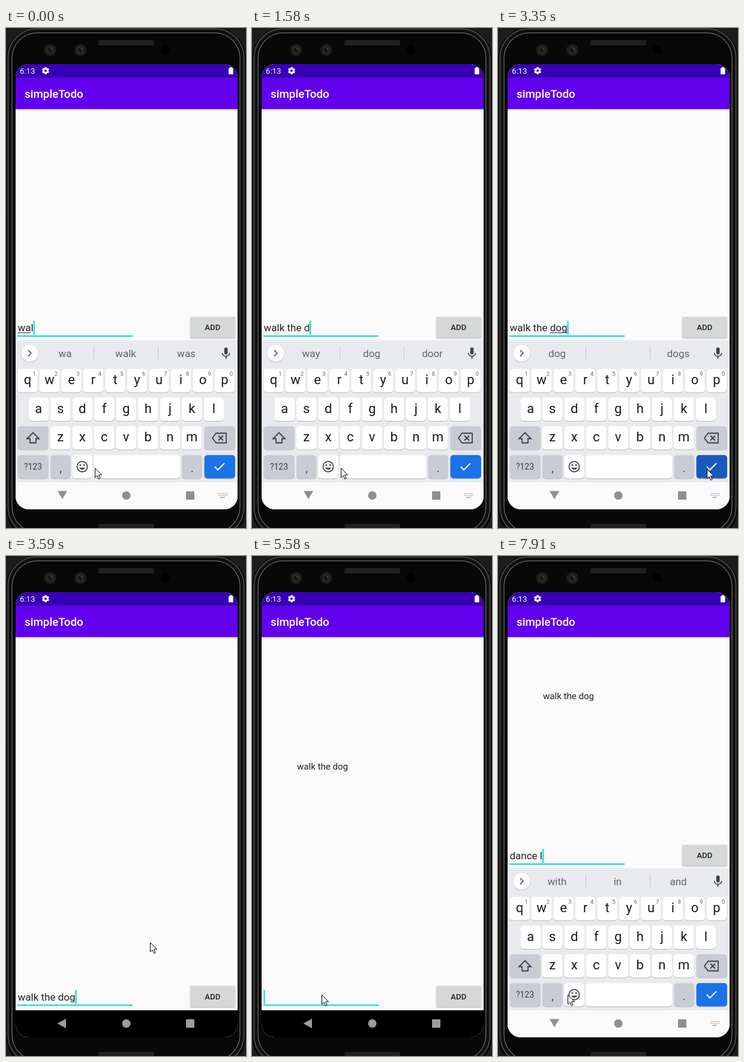
These frames come from a looping animation (400 px wide and 831 px high, 8 s). An HTML page with a canvas:

```html
<!DOCTYPE html>
<html lang="en">
<head>
<meta charset="utf-8">
<title>simpleTodo</title>
<style>
html, body { margin: 0; width: 100%; height: 100%; overflow: hidden; background: #000; }
canvas { display: block; width: 400px; height: 831px; }
</style>
</head>
<body>
<canvas id="stage" width="400" height="831"></canvas>
<script>
const ctx = document.getElementById('stage').getContext('2d');
const LOOP = 8000;

// Typing: time, text, underlined range, suggestions
const typing = [
  [0, 'wal', 0, 2, 'wa,walk,was'],
  [120, 'walk', 0, 3, 'wal,walk,walking'],
  [370, 'walk', 0, 4, 'walk,,wall'],
  [490, 'walk ', 0, 4, 'walk,,wall'],
  [800, 'walk ', 0, 0, 'in,the,to'],
  [950, 'walk t', 0, 0, 'in,the,to'],
  [1220, 'walk th', 5, 6, 't,the,to'],
  [1340, 'walk the', 5, 7, 'th,the,through'],
  [1460, 'walk the ', 5, 8, 'the,they,them'],
  [1580, 'walk the d', 0, 0, 'way,dog,door'],
  [1890, 'walk the do', 9, 10, 'd,do,did'],
  [2170, 'walk the dog', 9, 11, 'do,dog,does'],
  [2290, 'walk the dog', 9, 12, 'dog,,dogs'],
  [3470, 'walk the dog', 0, 0, 'dog,,dogs'],
  [4670, '', 0, 0, ''],
  [5980, 'da', 0, 1, 'd,do,did'],
  [6280, 'dan', 0, 2, 'da,day,dad'],
  [6430, 'danc', 0, 3, 'dan,dance,day'],
  [6550, 'dance', 0, 4, 'danc,dance,'],
  [6700, 'dance ', 0, 5, 'dance,,dancer'],
  [6980, 'dance ', 0, 0, 'with,in,and'],
  [7910, 'dance l', 0, 0, 'with,in,and']
];

// Pointer: time, x, y
const pointer = [
  [0, 148, 731], [2690, 165, 742], [2810, 230, 746], [2930, 310, 743], [3050, 344, 736],
  [3200, 348, 733], [3590, 240, 642], [3740, 233, 594], [3860, 216, 640], [3980, 211, 695],
  [4130, 232, 689], [4250, 300, 700], [4370, 343, 714], [4530, 344, 718], [4820, 335, 722],
  [4940, 270, 728], [5060, 190, 730], [5180, 135, 730], [5300, 116, 729]
];

const caretOff = [[2690, 3350], [3980, 4530], [5060, 5580], [7510, 7910]];

const within = (t, a, b) => t >= a && t < b;
const stateAt = (list, t) => list.findLast(entry => entry[0] <= t);

function box(x, y, w, h, r, fill) {
  ctx.beginPath();
  ctx.roundRect(x, y, w, h, r);
  ctx.fillStyle = fill;
  ctx.fill();
}

function disc(x, y, r, fill) {
  ctx.beginPath();
  ctx.arc(x, y, r, 0, Math.PI * 2);
  ctx.fillStyle = fill;
  ctx.fill();
}

function text(s, x, y, size, color, align = 'left', weight = 400) {
  ctx.font = `${weight} ${size}px Roboto, sans-serif`;
  ctx.textAlign = align;
  ctx.fillStyle = color;
  ctx.fillText(s, x, y);
}

function icon(d, x, y, color, width) {
  const path = new Path2D(d);
  ctx.save();
  ctx.translate(x, y);
  if (width) {
    ctx.strokeStyle = color;
    ctx.lineWidth = width;
    ctx.stroke(path);
  } else {
    ctx.fillStyle = color;
    ctx.fill(path);
  }
  ctx.restore();
}

function shadowed(blur, dy, alpha, draw) {
  ctx.save();
  ctx.shadowColor = `rgba(0,0,0,${alpha})`;
  ctx.shadowBlur = blur;
  ctx.shadowOffsetY = dy;
  draw();
  ctx.restore();
}

function outline(inset, radius, color, width) {
  ctx.beginPath();
  ctx.roundRect(inset, inset - 2, 400 - inset * 2, 850 - inset * 2, radius);
  ctx.strokeStyle = color;
  ctx.lineWidth = width;
  ctx.stroke();
}

function drawPhone() {
  box(0, 0, 400, 831, 0, '#1c1c1c');
  box(0.5, 0, 399, 850, 50, '#080808');
  outline(3.5, 48, '#484848', 2);
  outline(6.5, 45, '#101010', 3);
  outline(10, 42, '#606060', 1.5);
  for (const y of [20, 824]) {
    box(154, y, 93, 9, 3, '#202020');
    ctx.fillStyle = '#2e2e2e';
    for (let x = 157; x < 245; x += 3)
      for (let row = 2; row < 8; row += 3) ctx.fillRect(x, y + row, 1, 1);
  }
  for (const x of [73.5, 124]) {
    disc(x, 36.5, 10, '#1b1d20');
    disc(x, 36.5, 6.5, '#26292e');
    disc(x, 36.5, 3.5, '#111316');
    disc(x + 2, 35, 1.2, '#555a61');
  }
  disc(265, 37, 7.5, '#000');
}

function drawBars() {
  shadowed(3, 1, 0.2, () => box(16, 82, 370, 52.7, 0, '#6200ee'));
  box(16, 60, 370, 22.5, 0, '#3700b3');
  text('6:13', 23, 76, 13.2, '#fff');
  text('simpleTodo', 31, 116, 18.8, '#fff', 'left', 500);
  disc(66, 71, 4.6, '#fff');
  ctx.fillStyle = '#fff';
  for (let i = 0; i < 6; i++) {
    ctx.save();
    ctx.translate(66, 71);
    ctx.rotate(i * Math.PI / 3);
    ctx.fillRect(-1.6, -6, 3.2, 3);
    ctx.restore();
  }
  disc(66, 71, 2, '#3700b3');
  box(371, 66.5, 7.5, 10.5, 1, '#fff');
  box(373, 65, 3.5, 2, 0, '#fff');
}

function drawField(t, y, [, value, from, to]) {
  const left = 19.5, size = 17;
  const pressed = within(t, 4530, 4820);
  text(value, left, y + 24.4, size, '#212121');
  const width = n => ctx.measureText(value.slice(0, n)).width;
  if (to > from) {
    box(left + width(from), y + 26, width(to) - width(from), 1, 0, '#212121');
  }
  box(19, y + 31, 192, 2, 0, '#03dac5');
  if (!caretOff.some(([a, b]) => within(t, a, b))) {
    box(left + width(value.length), y + 6.5, 2, 23.5, 0, '#03dac5');
  }
  shadowed(pressed ? 4 : 2, 1, 0.3, () =>
    box(307, y, 75, 35, 2, pressed ? '#c0c1c1' : '#d6d7d7'));
  text('ADD', 344.3, y + 22, 13.2, '#212121', 'center', 500);
}

function key(x, y, w, fill = '#fff') {
  box(x - 0.4, y + 1, w + 0.8, 38.7, 5, 'rgba(0,0,0,0.18)');
  box(x - 0.4, y - 0.3, w + 0.8, 38.8, 5, fill);
}

function letterRow(letters, center, y, hints) {
  [...letters].forEach((c, i) => {
    const x = center + i * 36.5;
    key(x - 16.3, y, 32.6);
    text(c, x, y + 25, 22, '#17181a', 'center');
    if (hints) text((i + 1) % 10, x + 11, y + 10.5, 9.5, '#5f6368', 'center');
  });
}

function drawKeyboard(offset, suggestions, enterPressed) {
  const dark = '#3c4043', grey = '#c9ccd4';
  ctx.save();
  ctx.translate(0, offset);
  box(16, 519, 370, 281, 0, '#e8eaed');

  shadowed(2, 1, 0.2, () => disc(39.5, 540.5, 14, '#fff'));
  icon('M-2 -5 L3 0 L-2 5', 39, 540.5, '#5f6368', 1.8);
  box(146, 529, 1, 23, 0, '#c4c7cb');
  box(253, 529, 1, 23, 0, '#c4c7cb');
  suggestions.split(',').forEach((word, i) =>
    text(word, [98.5, 199.5, 300.5][i], 547, 17, '#5f6368', 'center'));
  box(363.8, 531, 5.6, 11.5, 2.8, dark);
  icon('M-6 -1 C-6 6.5 6 6.5 6 -1 M0 4.5 V9', 366.6, 541, dark, 1.7);

  letterRow('qwertyuiop', 36, 567, true);
  letterRow('asdfghjkl', 54.3, 614.5);
  letterRow('zxcvbnm', 90.7, 662);

  key(20, 662, 50.5, grey);
  icon('M0 -9 L10 1 H5 V8 H-5 V1 H-10 Z', 45, 681.5, dark, 1.8);
  key(331, 662, 50.5, grey);
  icon('M-6 -8 H11 V8 H-6 L-12 0 Z M-2 -4 L6 4 M6 -4 L-2 4', 356, 681.5, dark, 1.8);

  key(20, 710, 50.5, grey);
  text('?123', 45, 734, 14, dark, 'center');
  key(74.5, 710, 32.5, grey);
  text(',', 91, 738, 19, dark, 'center');
  key(110.8, 710, 32.5);
  icon('M8.6 0 A8.6 8.6 0 1 1 -8.6 0 A8.6 8.6 0 1 1 8.6 0', 127, 729, dark, 1.7);
  icon('M-4.8 1.8 H4.8 C3.2 6.2 -3.2 6.2 -4.8 1.8', 127, 729, dark);
  disc(123.9, 726.4, 1.4, dark);
  disc(130.1, 726.4, 1.4, dark);
  key(147, 710, 143);
  key(294, 710, 32.5, grey);
  text('.', 310.3, 738, 19, dark, 'center');
  key(331, 710, 50.5, enterPressed ? '#185abc' : '#1a73e8');
  icon('M-8 0 L-3 5.5 L8 -5.5', 356, 729, '#fff', 2);
  ctx.restore();
}

function drawNav(typingMode) {
  const grey = typingMode ? '#8f8f8f' : '#9c9c9c';
  box(16, 755, 370, 45, 0, typingMode ? '#fafafa' : '#000');
  if (typingMode) icon('M-8 -6 H8 L0 7.5 Z', 94, 775.5, grey);
  else icon('M7 -8 V8 L-7.5 0 Z', 93, 777, grey);
  disc(200.5, 777, 7, grey);
  box(300, 770, 14, 14, 1, grey);
  if (!typingMode) return;
  ctx.fillStyle = grey;
  for (let i = 0; i < 6; i++) {
    ctx.fillRect(354 + i * 2.7, 773, 1.3, 1.3);
    ctx.fillRect(354 + i * 2.7, 776, 1.3, 1.3);
  }
  ctx.fillRect(357, 779.5, 8, 1.2);
}

function drawPointer(x, y) {
  const shape = 'M.5 .5 V16 L4 12.7 L6.5 18.5 L9 17.4 L6.5 11.8 H11.5 Z';
  icon(shape, x, y, '#fff');
  icon(shape, x, y, '#000', 1);
}

function draw(t) {
  const entry = stateAt(typing, t);
  const keyboardShown = !within(t, 3590, 5980);
  const fieldUp = !within(t, 3470, 5980);
  const slide = within(t, 3470, 3590) ? 45 : within(t, 5980, 6130) ? 110 : 0;

  drawPhone();
  ctx.save();
  ctx.beginPath();
  ctx.roundRect(16, 60, 370, 740, 22);
  ctx.clip();
  box(16, 60, 370, 740, 0, '#fafafa');
  drawBars();
  if (t >= 4670) {
    ctx.globalAlpha = t < 4820 ? 0.5 : 1;
    text('walk the dog', 75, fieldUp ? 238 : 355, 15.07, '#212121');
    ctx.globalAlpha = 1;
  }
  drawField(t, fieldUp ? 480 : 714.5, entry);
  if (keyboardShown) drawKeyboard(slide, entry[4], within(t, 3350, 3590));
  drawNav(keyboardShown);
  ctx.restore();
  const [, x, y] = stateAt(pointer, t);
  drawPointer(x, y);
}

function frame() {
  draw(performance.now() % LOOP);
  requestAnimationFrame(frame);
}
frame();
</script>
</body>
</html>
```
